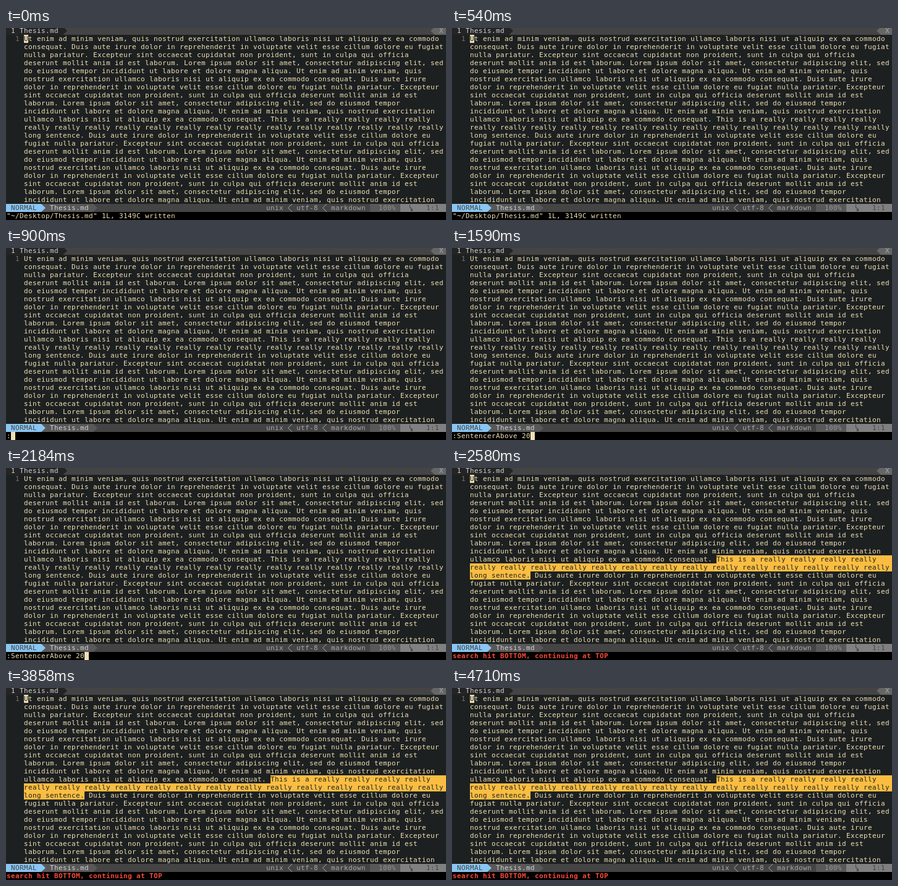
These frames come from a looping animation (712 by 310 pixels, 4.81 s). An HTML page:

```html
<!DOCTYPE html>
<html lang="en">
<head>
<meta charset="utf-8">
<title>Editor</title>
<style>
html, body { margin: 0; width: 100%; height: 100%; overflow: hidden; background: #000; }
#term {
  position: absolute; left: 0; top: 0; width: 712px; height: 310px; overflow: hidden;
  background: #1d2021; color: #f0dfb4;
  font: 11px/13px "DejaVu Sans Mono", "Liberation Mono", monospace;
  font-variant-ligatures: none; font-kerning: none;
}
#term div { position: absolute; height: 13px; white-space: pre; }
#term svg { position: absolute; left: 0; top: 0; }
</style>
</head>
<body>
<div id="term"></div>
<script>
const CELL = 7, ROW = 13, LEFT = 1, TOP = -2, COLS = 102;
const TAB = 0, STATUS = 22, CMD = 23, GUTTER = 4, WRAP = 97;
const INK = '#1d2021', CREAM = '#f0dfb4', AMBER = '#fabd41';
const term = document.getElementById('term');
const x = col => LEFT + col * CELL;
const y = row => TOP + row * ROW;

// Make every glyph advance exactly one cell.
function fitCells() {
  const probe = document.createElement('div');
  probe.textContent = 'm'.repeat(100);
  term.append(probe);
  const advance = probe.getBoundingClientRect().width / 100;
  probe.remove();
  term.style.letterSpacing = (CELL - advance) + 'px';
}

function put(col, row, text, fg, bg, cells = text.length) {
  const el = document.createElement('div');
  el.textContent = text;
  el.style.left = x(col) + 'px';
  el.style.top = y(row) + 'px';
  el.style.width = cells * CELL + 'px';
  if (fg) el.style.color = fg;
  if (bg) el.style.background = bg;
  term.append(el);
  return el;
}

function bar(row, from, to, color) {
  const el = put(from, row, '', null, color, to - from);
  if (from === 0) {
    el.style.left = 0;
    el.style.width = x(to) + 'px';
  }
}

const shapes = [];
function arrow(col, row, dir, color) {
  const back = x(dir > 0 ? col : col + 1), t = y(row);
  shapes.push(`<path d="M${back} ${t}l${dir * CELL} 6.5l${-dir * CELL} 6.5z" fill="${color}"/>`);
}
function line(d, color) {
  shapes.push(`<path d="${d}" fill="none" stroke="${color}"/>`);
}

function wrap(text) {
  const lines = [''];
  for (const word of text.split(' ')) {
    const last = lines[lines.length - 1];
    if (!last) lines[lines.length - 1] = word;
    else if (last.length + 1 + word.length <= WRAP) lines[lines.length - 1] += ' ' + word;
    else lines.push(word);
  }
  return lines;
}

fitCells();

// Document
const A = 'Lorem ipsum dolor sit amet, consectetur adipiscing elit, sed do eiusmod tempor incididunt ut labore et dolore magna aliqua.';
const B = 'Ut enim ad minim veniam, quis nostrud exercitation ullamco laboris nisi ut aliquip ex ea commodo consequat.';
const C = 'Duis aute irure dolor in reprehenderit in voluptate velit esse cillum dolore eu fugiat nulla pariatur.';
const D = 'Excepteur sint occaecat cupidatat non proident, sunt in culpa qui officia deserunt mollit anim id est laborum.';
const LONG = 'This is a ' + 'really '.repeat(18) + 'long sentence.';
const lines = wrap([B, C, D, A, B, C, D, A, B, LONG, C, D, A, B, C, D, A, B].join(' ')).slice(0, 21);
put(2, 1, '1', '#7c6f64');
lines.forEach((text, i) => put(GUTTER, i + 1, text));

// Highlighted sentence
const first = lines.findIndex(s => s.includes('This is'));
const start = lines[first].indexOf('This is');
const room = COLS - GUTTER;
const hits = [
  put(GUTTER + start, first + 1, lines[first].slice(start), INK, AMBER, room - start),
  put(GUTTER, first + 2, lines[first + 1], INK, AMBER, room),
  put(GUTTER, first + 3, 'long sentence.', INK, AMBER)
];

// Tab line
bar(TAB, 0, 13, '#242424');
bar(TAB, 13, 98, '#444444');
bar(TAB, 98, COLS, '#444444');
bar(TAB, 99, COLS, '#666666');
arrow(13, TAB, 1, '#242424');
arrow(98, TAB, -1, '#666666');
put(1, TAB, '1 Thesis.md', '#d0d0d0');
put(100, TAB, 'X', '#a8a8a8');

// Status line
bar(STATUS, 0, 8, '#8ac6f2');
bar(STATUS, 8, 20, '#585858');
bar(STATUS, 20, 84, '#444444');
bar(STATUS, 84, 91, '#585858');
bar(STATUS, 91, COLS, '#808080');
arrow(8, STATUS, 1, '#8ac6f2');
arrow(20, STATUS, 1, '#585858');
arrow(84, STATUS, -1, '#585858');
arrow(91, STATUS, -1, '#808080');
for (const col of [65, 73]) line(`M${x(col + 1)} ${y(STATUS)}l-6.5 6.5l6.5 6.5`, '#a8a8a8');
line(`M${x(93) + 1.5} ${y(STATUS) + 1}v5.5h2.5`, '#444444');
line(`M${x(93) + 3.5} ${y(STATUS) + 12}v-4.5l2 4.5v-4.5`, '#444444');
put(1, STATUS, 'NORMAL', '#444444');
put(10, STATUS, 'Thesis.md', '#d0d0d0');
put(60, STATUS, 'unix', '#a8a8a8');
put(67, STATUS, 'utf-8', '#a8a8a8');
put(75, STATUS, 'markdown', '#a8a8a8');
put(86, STATUS, '100%', '#969696');
put(97, STATUS, '1:1', '#444444');
term.insertAdjacentHTML('beforeend', `<svg width="712" height="310">${shapes.join('')}</svg>`);

// Command line and cursor
bar(CMD, 0, COLS, '#000');
const command = put(0, CMD, '', null, null, COLS);
const cursor = put(GUTTER, 1, ' ', INK, CREAM);

const LOOP = 4810;
const steps = [
  { at: 0, text: '"~/Desktop/Thesis.md" 1L, 3149C written' },
  { at: 900, text: ':', typing: true },
  { at: 1590, text: ':SentencerAbove 20', typing: true },
  { at: 2580, text: 'search hit BOTTOM, continuing at TOP', found: true }
];

let shown = null;
function show(step) {
  if (step === shown) return;
  shown = step;
  command.textContent = step.text;
  command.style.color = step.found ? '#fb4934' : CREAM;
  command.style.fontWeight = step.found ? 'bold' : 'normal';
  for (const el of hits) el.style.visibility = step.found ? 'visible' : 'hidden';
  cursor.textContent = step.typing ? ' ' : 'U';
  cursor.style.left = x(step.typing ? step.text.length : GUTTER) + 'px';
  cursor.style.top = y(step.typing ? CMD : 1) + 'px';
}

const began = performance.now();
function tick() {
  const t = (performance.now() - began) % LOOP;
  show(steps.filter(s => s.at <= t).pop() || steps[0]);
  requestAnimationFrame(tick);
}
tick();
</script>
</body>
</html>
```
